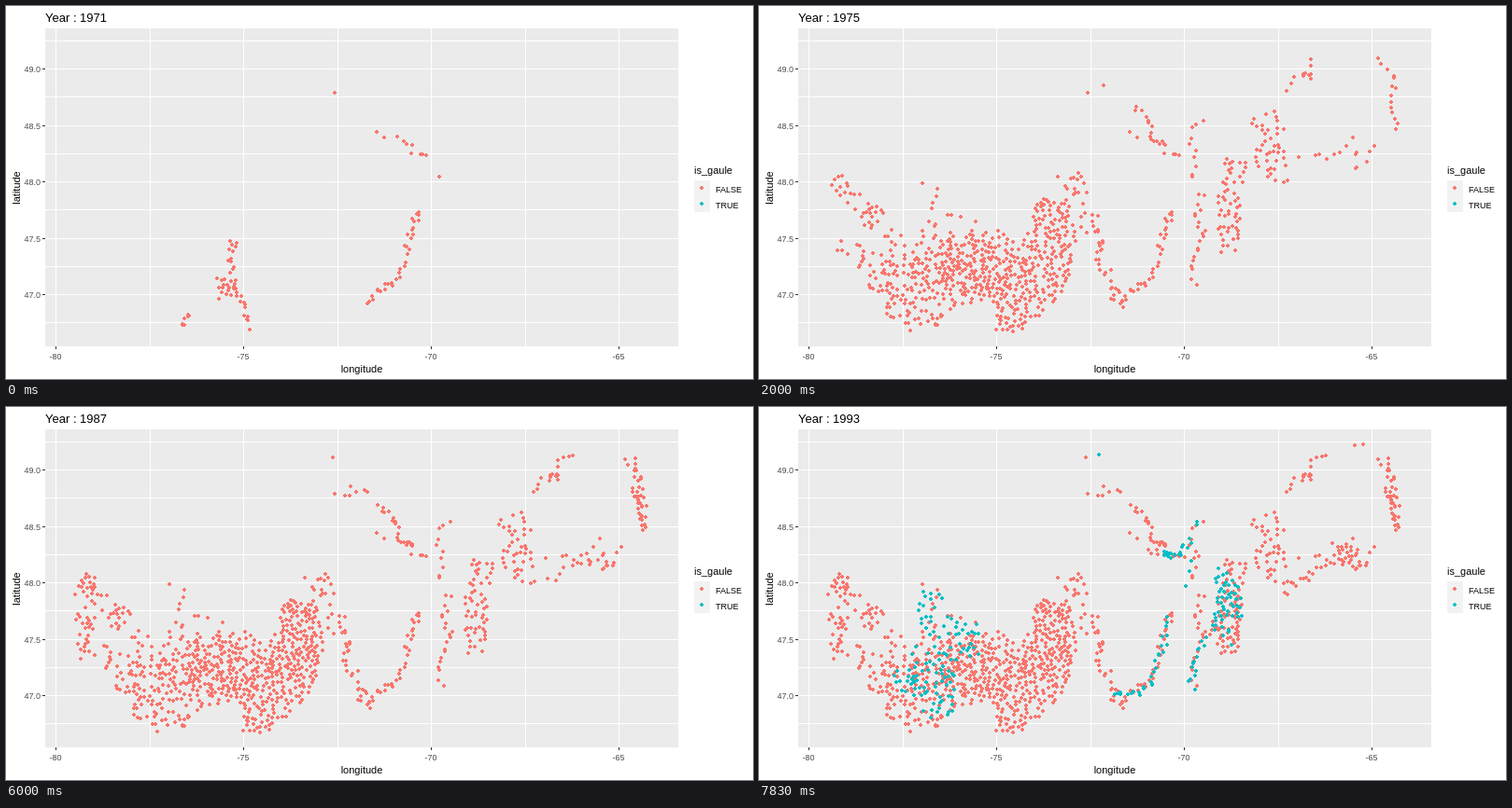
Animation, 800 px wide and 400 px high, one loop 8000 ms. Source, as an HTML page with a canvas:

```html
<!DOCTYPE html>
<html>
<head>
<meta charset="utf-8">
<style>
  html, body { margin: 0; width: 100%; height: 100%; overflow: hidden; background: #fff; }
  canvas { display: block; }
</style>
</head>
<body>
<canvas id="stage" width="800" height="400"></canvas>
<script>
const ctx = document.getElementById('stage').getContext('2d');
const LOOP = 8000, STEPS = 48;
const RED = '#F8766D', TEAL = '#00BFC4';
const FONT = 'px "Liberation Sans", Arial, sans-serif';

let seed = 1971;
function random() {
  seed = (seed * 1664525 + 1013904223) % 4294967296;
  return seed / 4294967296;
}
const between = (low, high) => low + random() * (high - low);

const dots = [];
let steps, color;

// Sets when the following dots appear (taking turns over the steps) and their colour.
function era(newSteps, newColor = RED) {
  steps = newSteps;
  color = newColor;
}

function addDot(x, y, i = 0) {
  dots.push({ x: Math.round(x), y: Math.round(y), color, step: steps[i % steps.length] });
}

// Fills a polygon with random dots that hardly overlap.
function spread(count, ...corners) {
  const area = new Path2D('M' + corners.join(' ') + 'Z');
  const xs = corners.map(c => c[0]), ys = corners.map(c => c[1]);
  for (let tries = 0, n = 0; n < count && tries < count * 40; tries++) {
    const x = between(Math.min(...xs), Math.max(...xs));
    const y = between(Math.min(...ys), Math.max(...ys));
    const taken = dots.some(d => d.color === color && Math.hypot(d.x - x, d.y - y) < 3);
    if (!taken && ctx.isPointInPath(area, x, y)) addDot(x, y, n++);
  }
}

// Strings dots along a bent line, each a little off it.
function trail(count, jitter, ...bends) {
  for (let i = 0; i < count; i++) {
    const at = (i + random()) / count * (bends.length - 1);
    const k = Math.floor(at), [x0, y0] = bends[k], [x1, y1] = bends[k + 1];
    addDot(x0 + (x1 - x0) * (at - k) + between(-jitter, jitter),
           y0 + (y1 - y0) * (at - k) + between(-jitter, jitter), i);
  }
}

// 1971
era([0]);
trail(30, 4, [244, 250], [241, 272], [243, 300], [254, 318], [257, 346]);
spread(13, [225, 292], [252, 294], [250, 312], [228, 319]);
trail(7, 3, [188, 343], [197, 330]);
trail(34, 4, [444, 220], [434, 236], [430, 265], [421, 292], [402, 304], [386, 323]);
trail(10, 3, [392, 136], [422, 142], [437, 158], [451, 160]);
addDot(352, 93);
addDot(464, 183);

// 1972 to 1974
era([3]);
spread(135, [113, 282], [130, 265], [165, 272], [205, 242], [234, 250], [232, 300],
  [198, 335], [160, 350], [122, 322]);
era([6]);
spread(85, [186, 270], [205, 240], [254, 238], [276, 255], [270, 300], [250, 311], [195, 308]);
era([9]);
spread(25, [115, 285], [183, 262], [270, 255], [240, 316], [160, 350]);
trail(11, 3, [193, 193], [185, 212], [185, 236], [207, 224], [241, 230]);
trail(8, 2, [106, 253], [112, 268], [107, 283]);
spread(14, [317, 179], [348, 179], [352, 204], [330, 204]);
trail(6, 3, [327, 211], [354, 212], [346, 232], [350, 248]);

// 1975
era([10, 11, 12]);
spread(225, [254, 350], [254, 298], [282, 255], [300, 204], [334, 212], [342, 262],
  [325, 310], [296, 338], [283, 350]);
spread(45, [111, 245], [155, 238], [245, 245], [262, 265], [256, 312], [150, 320]);
spread(32, [75, 190], [92, 173], [106, 200], [135, 221], [124, 248], [98, 216]);
trail(4, 3, [92, 249], [82, 262], [95, 270]);
trail(32, 6, [360, 224], [365, 250], [366, 275], [380, 302], [387, 322]);
trail(12, 3, [400, 110], [418, 117], [421, 140], [436, 150]);
trail(9, 3, [464, 183], [467, 163], [462, 134], [476, 120]);
trail(12, 3, [564, 92], [582, 70], [590, 78], [592, 56]);
trail(14, 3, [663, 51], [680, 80], [676, 110], [683, 131]);
trail(15, 4, [577, 163], [615, 160], [635, 143], [642, 174], [665, 146]);
spread(42, [531, 108], [562, 110], [567, 190], [545, 188], [522, 152]);
spread(55, [490, 190], [500, 162], [522, 155], [519, 228], [511, 262], [493, 268]);
trail(20, 4, [476, 194], [469, 227], [478, 245], [463, 270], [466, 301]);
addDot(369, 85);
addDot(175, 190);

// 1984 to 1987
era([30, 32, 34, 36]);
spread(30, [73, 190], [91, 166], [103, 208], [88, 255], [78, 284]);
spread(38, [300, 212], [334, 214], [340, 265], [320, 300], [275, 285]);
trail(26, 4, [670, 55], [675, 92], [683, 105], [682, 129]);
trail(6, 2, [597, 54], [608, 49], [586, 78], [566, 92]);
trail(15, 4, [577, 190], [610, 168], [632, 165], [652, 172]);
trail(10, 3, [362, 97], [384, 86], [408, 118], [440, 154]);
addDot(350, 54);

// 1988 to 1993
era([38, 40, 42]);
spread(16, [612, 146], [638, 146], [650, 176], [624, 170]);
trail(9, 4, [563, 200], [574, 188], [604, 168]);
trail(9, 4, [416, 150], [435, 158], [470, 160]);
spread(24, [480, 245], [495, 180], [520, 186], [513, 262], [494, 267]);
addDot(647, 40);
era([44]);
addDot(638, 41);

era([44, 46], TEAL);
spread(115, [172, 192], [194, 192], [203, 226], [237, 226], [237, 265], [213, 278],
  [208, 330], [180, 343], [140, 290], [168, 260]);
spread(44, [490, 172], [515, 174], [518, 225], [486, 230]);
trail(8, 5, [484, 236], [495, 238], [510, 252]);
trail(16, 6, [433, 160], [455, 153]);
trail(30, 4, [440, 222], [432, 262], [422, 292], [405, 306], [377, 309]);
trail(14, 4, [478, 242], [467, 275], [463, 300]);
trail(7, 2, [455, 197], [465, 165], [461, 134], [475, 117]);
addDot(364, 51);

function rect(x, y, w, h, fill) {
  ctx.fillStyle = fill;
  ctx.fillRect(x, y, w, h);
}

function text(str, x, y, size, align = 'left', fill = '#000') {
  ctx.font = size + FONT;
  ctx.textAlign = align;
  ctx.fillStyle = fill;
  ctx.fillText(str, x, y);
}

// A small round dot with hard pixel edges.
function dot(x, y, fill) {
  rect(x - 2, y - 1, 4, 2, fill);
  rect(x - 1, y - 2, 2, 4, fill);
}

function drawChart() {
  rect(0, 0, 800, 400, '#fff');
  rect(42, 24, 678, 341, '#EBEBEB');
  for (let i = 0; i < 7; i++) {
    const x = Math.round(53 + i * 100.5);
    rect(x, 24, 1, 341, '#fff');
    if (i % 2 === 0) {
      rect(x, 365, 1, 3, '#333');
      text(String(-80 + i * 2.5), x, 379, 9, 'center', '#4D4D4D');
    }
  }
  for (let i = 0; i < 11; i++) {
    const y = Math.round(36.9 + i * 30.25);
    rect(42, y, 678, 1, '#fff');
    if (i % 2) {
      rect(39, y, 3, 1, '#333');
      text((49.25 - i * 0.25).toFixed(1), 37, y + 4, 9, 'right', '#4D4D4D');
    }
  }
  text('longitude', 381, 393, 11, 'center');
  ctx.save();
  ctx.translate(15, 195);
  ctx.rotate(-Math.PI / 2);
  text('latitude', 0, 0, 11, 'center');
  ctx.restore();

  text('is_gaule', 737, 180, 11);
  rect(737, 187, 17, 34, '#F2F2F2');
  dot(745, 195, RED);
  dot(745, 212, TEAL);
  text('FALSE', 760, 200, 9);
  text('TRUE', 760, 217, 9);
}

// Early years last three steps each, later ones two.
function yearAt(step) {
  return step < 11 ? 1971 + Math.floor((step + 1) / 3) : 1975 + Math.floor((step - 11) / 2);
}

function draw() {
  const time = performance.now() % LOOP;
  const step = Math.floor((time + 5) * STEPS / LOOP) % STEPS;
  drawChart();
  text('Year : ' + yearAt(step), 42, 17, 13);
  for (const d of dots) if (d.step <= step) dot(d.x, d.y, d.color);
  requestAnimationFrame(draw);
}
draw();
</script>
</body>
</html>
```
